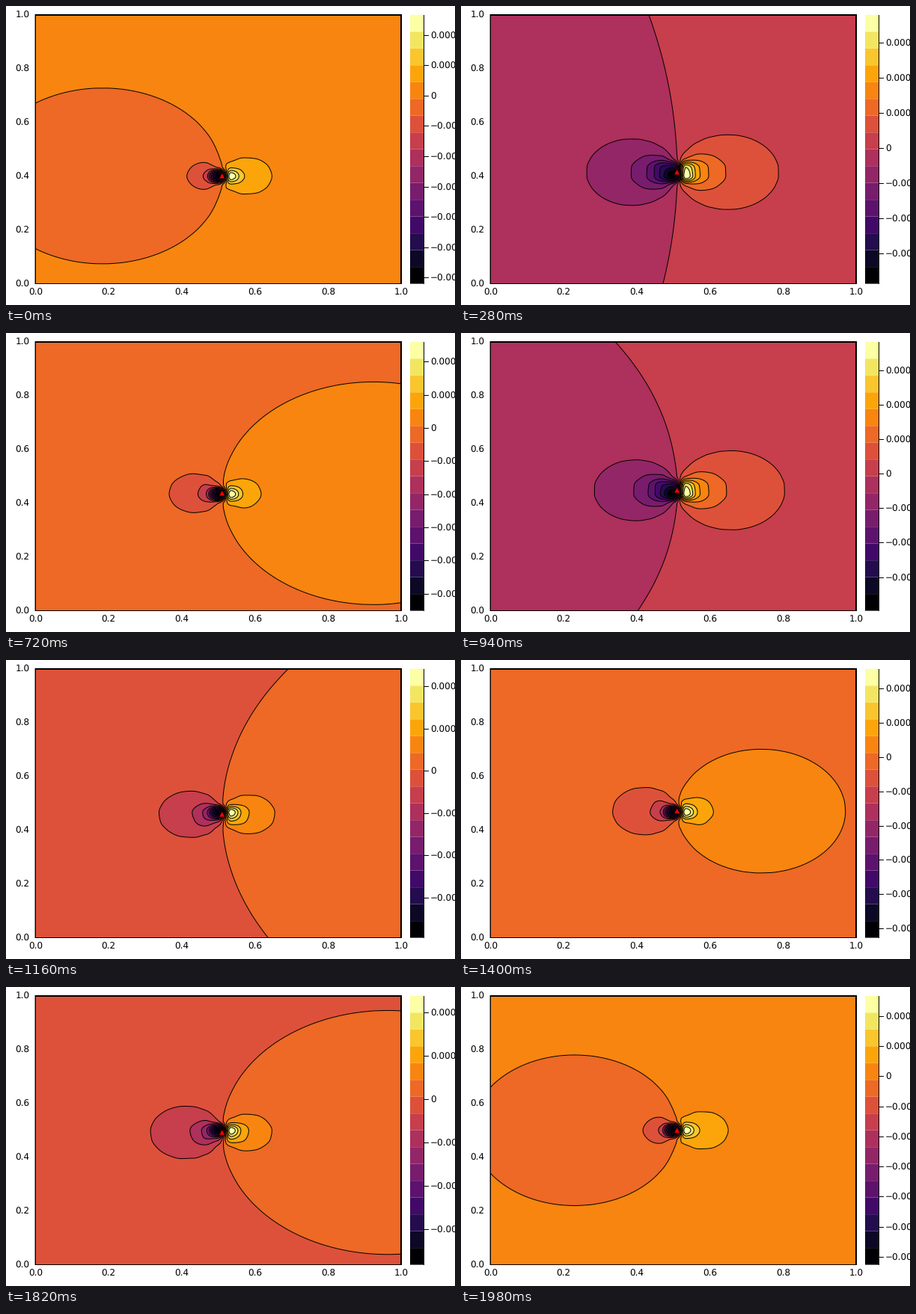
Animation, 600 px wide and 400 px high, one loop 2 s. Source, as a matplotlib script:

```python
import math

import matplotlib.pyplot as plt
import numpy as np
from matplotlib.animation import FuncAnimation
from matplotlib.patches import Polygon, Rectangle

W, H, DPI = 600, 400, 100
FRAMES, INTERVAL = 100, 20
LEFT, RIGHT, TOP, BOTTOM = 39.4, 528.2, 11.8, 371.6
BAR_X, BAR_W = 540, 18.3
BANDS = 16
CELLS, FINE = 30, 6
SRC_X = 0.51
STRENGTH = 6.25e-6
PIXEL = 72 / DPI
FONT = 12 * PIXEL

plt.rcParams["font.family"] = "DejaVu Sans"
plt.rcParams["text.hinting"] = "none"

fig = plt.figure(figsize=(W / DPI, H / DPI), dpi=DPI, facecolor="white")
ax = fig.add_axes([0, 0, 1, 1])
ax.set_xlim(0, W)
ax.set_ylim(H, 0)
ax.axis("off")
ax.set_autoscale_on(False)

colors = plt.get_cmap("inferno")(np.linspace(0, 1, BANDS))
grid = np.linspace(0, 1, CELLS + 1)
gx, gy = np.meshgrid(grid, grid)


def px(x):
    return LEFT + x * (RIGHT - LEFT)


def py(y):
    return BOTTOM - y * (BOTTOM - TOP)


def box(x, y, w, h, color="black", z=5, snap=None):
    return ax.add_patch(Rectangle((x, y), w, h, fc=color, lw=0, zorder=z, snap=snap))


def label(x, y, text, ha):
    # Digits are centred on y by shifting the baseline.
    return ax.text(x, y + 4.3, text, ha=ha, va="baseline", fontsize=FONT, zorder=6)


def draw_static():
    box(38.6, 11, 1.4, 361, snap=False)
    box(39, 371, 490, 1)
    box(39, 11, 490, 2)
    box(527, 11, 2, 361)
    for v in np.linspace(0, 1, 6):
        label(px(v), 383, f"{v:.1f}", "center")
        label(31.5, py(v), f"{v:.1f}", "right")
    band = (BOTTOM - TOP) / BANDS
    for i, c in enumerate(colors):
        box(BAR_X, BOTTOM - (i + 1) * band, BAR_W, band, c, 2, snap=False)
    box(558, 12, 1, 360)


# Cell index and offset of every fine sample along one axis.
pos = np.linspace(0, CELLS, CELLS * FINE + 1)
cell = np.minimum(pos.astype(int), CELLS - 1)
t = pos - cell
fine_x = px(pos / CELLS)
fine_y = py(pos / CELLS)


def refine(z):
    """Monotone cubic interpolation along the rows."""
    d = np.diff(z, axis=1)
    a, b = d[:, :-1], d[:, 1:]
    same = a * b > 0
    slope = np.empty_like(z)
    slope[:, 0], slope[:, -1] = d[:, 0], d[:, -1]
    slope[:, 1:-1] = np.where(same, 2 * a * b / np.where(same, a + b, 1), 0)
    rise = t * t * (3 - 2 * t)
    return (z[:, cell] + d[:, cell] * rise
            + slope[:, cell] * t * (1 - t) ** 2
            - slope[:, cell + 1] * t * t * (1 - t))


def tick_step(span):
    power = 10 ** math.floor(math.log10(span))
    factor = span / power
    unit = 1 if factor > 5 else 0.5 if factor > 2.5 else 0.25
    return unit * power


def tick_text(value, step):
    if value == 0:
        return "0"
    digits = 4 if step > 7e-5 else 5
    return f"{value:.{digits}f}".replace("-", "\u2212")


draw_static()
live = []


def update(i):
    while live:
        live.pop().remove()

    src_y = 0.4 + 0.001 * (i + 1)
    dx, dy = gx - SRC_X, gy - src_y
    field = STRENGTH * dx / (dx**2 + dy**2)
    lo, hi = field.min(), field.max()
    span = hi - lo

    levels = np.linspace(lo, hi, BANDS + 1)
    inner = levels[1:-1].copy()
    levels[0] -= span * 1e-6
    levels[-1] += span * 1e-6
    smooth = refine(refine(field).T).T
    live.append(ax.contourf(fine_x, fine_y, smooth, levels=levels,
                            colors=colors, zorder=1))
    live.append(ax.contour(fine_x, fine_y, smooth, levels=inner, colors="black",
                           linestyles="solid", linewidths=PIXEL, zorder=3))

    cx, cy = px(SRC_X), py(src_y)
    marker = Polygon([(cx, cy - 4.3), (cx + 4.1, cy + 3.6), (cx - 4.1, cy + 3.6)],
                     fc="red", ec="black", lw=0.8 * PIXEL, zorder=4)
    live.append(ax.add_patch(marker))

    step = tick_step(span)
    for k in range(math.ceil(lo / step), math.floor(hi / step) + 1):
        y = TOP + (hi - k * step) / span * (BOTTOM - TOP)
        live.append(box(558.5, y - 0.5, 6, 1))
        live.append(label(567, y, tick_text(k * step, step), "left"))
    return live


anim = FuncAnimation(fig, update, frames=FRAMES, interval=INTERVAL,
                     init_func=lambda: [], repeat=True, repeat_delay=0, blit=False)
plt.show()
```
